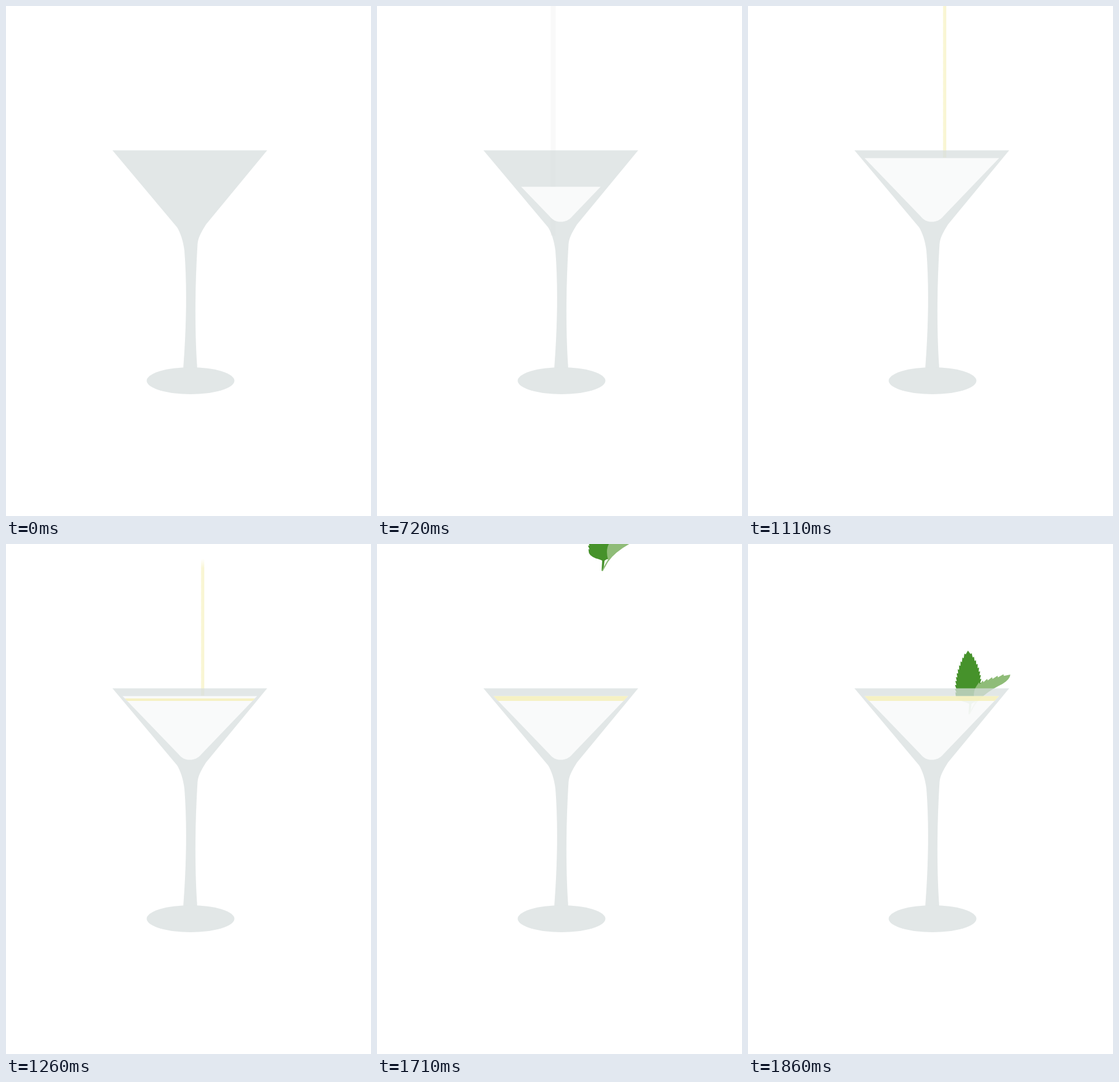
Write an HTML page that moves like this. It is 624x871 px and loops after 4.08 s.

```html
<!DOCTYPE html>
<html lang="en">
<head>
<meta charset="utf-8">
<title>Cocktail</title>
<style>
html, body { margin: 0; width: 100%; height: 100%; overflow: hidden; background: #fff; }
svg { display: block; width: 624px; height: 871px; overflow: hidden; }
</style>
</head>
<body>
<svg viewBox="0 0 624 871">
  <defs>
    <clipPath id="bowl">
      <path d="M199 259.5H429.5L334 359C328 366 322 368.5 314 368.5S301 366 295 359Z"/>
    </clipPath>
    <linearGradient id="fade" x2="0" y2="1">
      <stop offset="0" stop-color="#f9f6d4" stop-opacity="0"/>
      <stop offset=".07" stop-color="#f9f6d4"/>
    </linearGradient>
  </defs>
  <rect id="gin" fill="#f9f9f9"/>
  <rect id="juice" x="333.5" width="5.5" fill="url(#fade)"/>
  <g id="mint">
    <path id="dark" fill="#46922b"/>
    <path id="light" fill="#8fbc78"/>
  </g>
  <g opacity=".74" fill="#d8dfdf">
    <path d="M182 246.5H446.5L342 373C336 383 329 393 327.5 406C323 480 322.500 555 327 619H303C308 555 310 480 305 418C303 401 298 387 292.500 378Z"/>
    <ellipse cx="315.5" cy="640" rx="75" ry="23"/>
  </g>
  <g clip-path="url(#bowl)">
    <rect id="clear" x="190" width="250" height="120" fill="#fff" opacity=".8"/>
    <rect id="top" x="190" width="250" fill="#f6efb6" opacity=".8"/>
  </g>
</svg>
<script>
const LOOP = 4080, STEP = 30;
const $ = id => document.getElementById(id);
const clamp = v => Math.max(0, Math.min(1, v));
const set = (id, attrs) => {
  for (const k in attrs) $(id).setAttribute(k, attrs[k]);
};

// Saw-toothed quadratic curve from a to b; d is the tooth depth and side.
function saw(a, c, b, n, d) {
  const at = (t, i) => (1 - t) ** 2 * a[i] + 2 * t * (1 - t) * c[i] + t * t * b[i];
  const slope = (t, i) => (1 - t) * (c[i] - a[i]) + t * (b[i] - c[i]);
  const pts = [a];
  for (let k = 1; k <= n; k++) {
    const t = k / n, x = at(t, 0), y = at(t, 1);
    const dx = slope(t, 0), dy = slope(t, 1), r = d / Math.hypot(dx, dy);
    if (k < n) pts.push([x + dy * r, y - dx * r]);
    pts.push([x, y]);
  }
  return pts;
}

const tip = [376, 182];
const left = saw([356.5, 254], [354, 218], tip, 11, 2.6);
const right = saw([396, 250], [401, 214], tip, 11, -2.6).reverse();
set('dark', { d: `M${left.join('L')}L${right.join('L')}L389 270Q385 270 382 273
  L380 289Q378 292 377 290L378 273Q375 271 367 269Q355 264 355 258L354.5 253Z` });

const upper = saw([391, 242], [408, 231], [448.5, 223], 7, 3);
set('light', { d: `M${upper.join('L')}Q448 231 435 239Q402 255 388 275L379 291L377.500 290
  Q380 284 388 271Q383 253 391 242Z` });

function draw(now) {
  const t = Math.floor(now % LOOP / STEP) * STEP;

  // Clear stream and rising drink
  const u = Math.max(0, (t - 600) / 240) ** 2;
  const ginTop = 43 * Math.max(0, (t - 760) / 80) ** 2;
  const ginEnd = 380 * clamp((t - 510) / 90) + 49 * u;
  set('gin', { x: 296 + 4 * u, y: ginTop, width: Math.max(0, 9 - 2 * u),
    height: Math.max(0, ginEnd - ginTop) });
  set('clear', { y: t < 600 ? 380 : 358 - 98.5 * clamp((t - 600) / 240) });

  // Yellow stream and top layer
  const juiceTop = t < 1230 ? -20 : 25 * ((t - 1200) / 60) ** 2;
  const juiceEnd = t < 1050 ? -20 : 259 * clamp((t - 1020) / 90);
  set('juice', { y: juiceTop, height: Math.max(0, juiceEnd - juiceTop) });
  const layer = 8.5 * clamp((t - 1110) / 300);
  set('top', { y: 268 - layer, height: layer });

  // Mint drops past its rest, then settles
  const drop = t < 1830 ? -313 + 342 * clamp((t - 1680) / 150)
    : 29 * (1 - clamp((t - 1830) / 30));
  set('mint', { transform: `translate(${-drop / 35} ${drop})` });
}

const start = performance.now();
(function tick() {
  draw(performance.now() - start);
  requestAnimationFrame(tick);
})();
</script>
</body>
</html>
```
